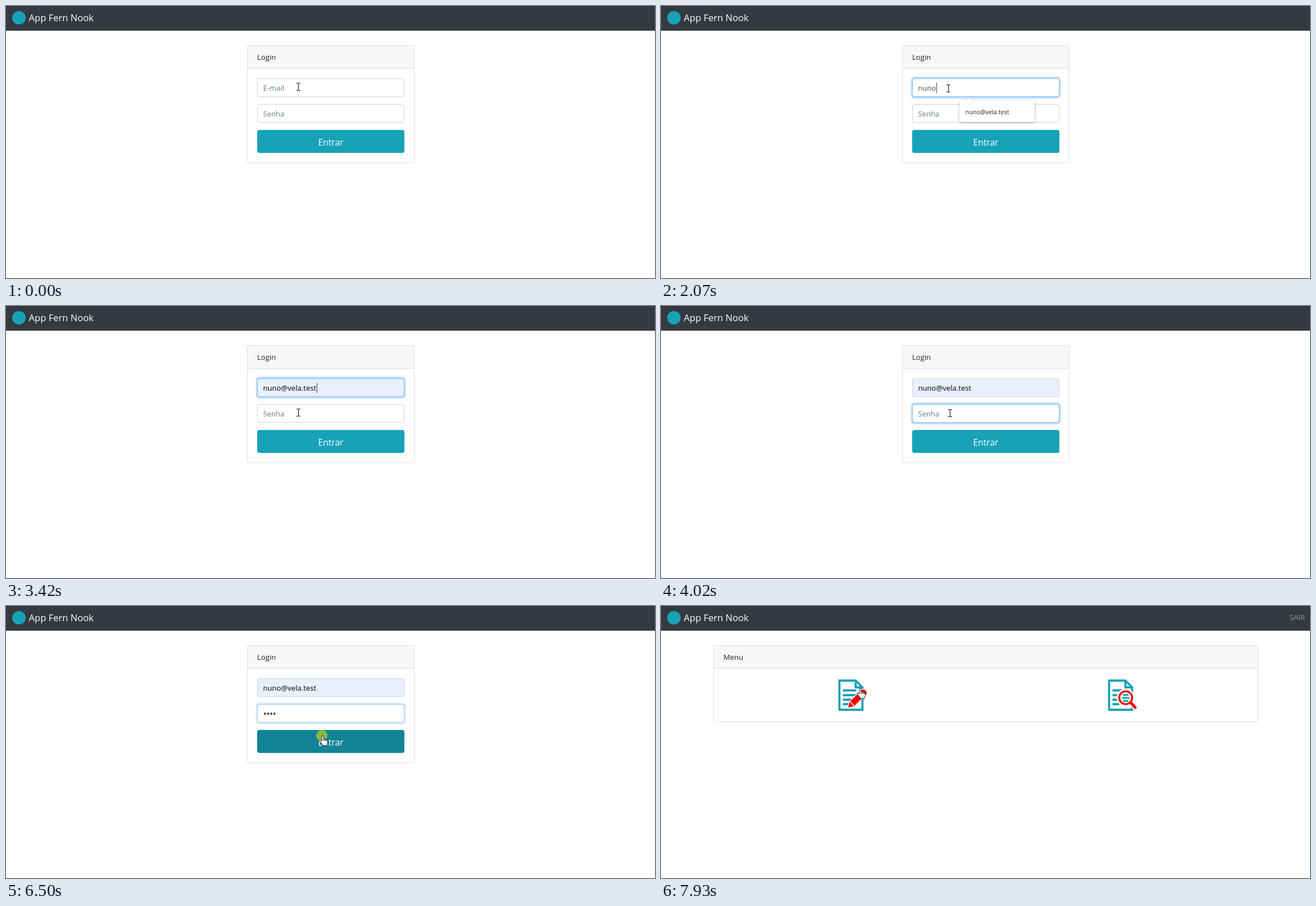
An HTML page for the animation above (7.99 s loop, 1155x485 px).

```html
<!DOCTYPE html>
<html lang="pt">
<head>
<meta charset="utf-8">
<title>Login</title>
<style>
  html, body { margin: 0; width: 100%; height: 100%; overflow: hidden; background: #fff; }
  svg { display: block; width: 1155px; height: 485px; font: 13.1px "Open Sans", "Noto Sans", sans-serif; fill: none; }
  text { fill: #212529; white-space: pre; }
  .card { fill: #fff; stroke: #dfdfdf; }
  .head { fill: #f7f7f7; stroke: #dfdfdf; }
  .field { fill: #fff; stroke: #ced4da; }
  .hint { fill: #5f7f92; }
  .popup { fill: #fff; filter: drop-shadow(0 1px 2px #0005); }
  .small { font-size: 10.8px; }
  .teal { stroke: #17a2b8; stroke-width: 3.8; }
  .red { stroke: #f00; }
  .halo { stroke: #fff; }
</style>
</head>
<body>
<svg viewBox="0 0 1155 485">
  <defs>
    <g id="page">
      <path class="teal" d="M2 2H31L43 14V54H2Z" fill="#fff"/>
      <path class="teal" d="M31 2V14H43" stroke-width="3"/>
      <path class="teal" d="M8 19.5H32M8 28H32M8 36H26M8 44H20"/>
    </g>
    <g id="ring">
      <rect x="446" y="-1.5" width="264" height="36" rx="5" stroke="#007bff" stroke-opacity=".25" stroke-width="3"/>
      <rect x="447.5" y=".5" width="261" height="32" rx="3.5" stroke="#80bdff"/>
    </g>
  </defs>

  <path fill="#343a40" d="M0 0H1155V44H0Z"/>
  <circle id="logo" cx="23" cy="21" r="12" fill="#17a2b8"/>
  <text x="40.500" y="27" font-size="16.6" style="fill:#fff">App Fern Nook</text>

  <g id="login">
    <rect class="card" x="429.500" y="70.500" width="297" height="209" rx="3.500"/>
    <path class="head" d="M429.500 111.500V74a3.500 3.500 0 0 1 3.500-3.500H723a3.500 3.500 0 0 1 3.500 3.500V111.500Z"/>
    <text x="447" y="96">Login</text>
    <rect id="emailBox" class="field" x="447.500" y="129.500" width="261" height="32" rx="3.500"/>
    <rect class="field" x="447.500" y="175.500" width="261" height="32" rx="3.500"/>
    <use id="ringEmail" href="#ring" y="129"/>
    <use id="ringPass" href="#ring" y="175"/>
    <text id="emailHint" class="hint" x="457.500" y="150.500">E-mail</text>
    <text id="passHint" class="hint" x="457.500" y="196.500">Senha</text>
    <text id="email" x="457.500" y="150.500"></text>
    <g id="dots" fill="#343a40"></g>
    <path id="caret" d="M.5 0V18" stroke="#343a40"/>
    <rect id="buttonRing" x="445.500" y="219.500" width="265" height="44" rx="5.500" stroke="#3ab0c3" stroke-opacity=".5" stroke-width="3"/>
    <rect id="button" x="447" y="221" width="262" height="41" rx="4"/>
    <text x="578" y="248.500" font-size="15.6" text-anchor="middle" style="fill:#fff">Entrar</text>
    <g id="popup">
      <g class="popup">
        <path d="M541 169L548 163L555 169Z"/>
        <rect id="popupBox" x="531" y="168" rx="4"/>
      </g>
      <path id="hover" fill="#eee" d="M531 173H664V203H531Z"/>
      <g id="items" class="small"></g>
    </g>
  </g>

  <g id="menu">
    <rect class="card" x="93.500" y="70.500" width="969" height="136" rx="3.500"/>
    <path class="head" d="M93.500 111.500V74a3.500 3.500 0 0 1 3.500-3.500H1059a3.500 3.500 0 0 1 3.500 3.500V111.500Z"/>
    <text x="111" y="96">Menu</text>
    <text x="1146" y="25" text-anchor="end" style="fill:#999c9f">SAIR</text>
    <g id="icons">
      <use href="#page" x="315.500" y="131"/>
      <g transform="translate(333 181) rotate(-44)">
        <path d="M0 0L9-5.500H39a4 4 0 0 1 4 4V1.500a4 4 0 0 1-4 4H9Z" fill="#f00" stroke="#fff" stroke-width="2.500" paint-order="stroke"/>
        <path class="halo" d="M9.500-5V5M34-5.500V5.500" stroke-width="1.500"/>
      </g>
      <use href="#page" x="795.500" y="131"/>
      <g stroke-linecap="round">
        <path class="halo" d="M835 172L844 181" stroke-width="9"/>
        <circle class="halo" cx="827" cy="163.500" r="12" stroke-width="8" fill="#fff"/>
        <path class="teal" d="M822 158.500H832M820 164H834M822 169.500H832" stroke-linecap="butt" style="stroke-width:3"/>
        <circle class="red" cx="827" cy="163.500" r="11.500" stroke-width="3.500"/>
        <path class="red" d="M836.500 173L844 181" stroke-width="5"/>
      </g>
    </g>
  </g>

  <g id="cursor">
    <circle id="click" cx="0" cy="0" r="10" fill="#9dc52f" fill-opacity=".82"/>
    <path id="beam" d="M-3-6.500H-1Q.5-6.500.5-5V5Q.5 6.500-1 6.500H-3M4-6.500H2Q.5-6.500.5-5V5Q.5 6.500 2 6.500H4" stroke="#000"/>
    <path id="arrow" d="M0 0V13L3 10.300L5.200 15.300L7.400 14.300L5.200 9.500H9.500Z" fill="#000" stroke="#fff" stroke-width=".7"/>
    <path id="hand" d="M0 1.500Q0 0 1.500 0T3 1.500V6Q5.500 5.300 5.700 7Q8 6.500 8.300 8Q10.500 7.500 10.500 9.500V13Q10 15 9 16.500V18H1.500V16.500L-4 10Q-4.500 8 -2.500 8.200L0 10Z M3 6V9.500M5.700 7V9.800M8.300 8V10" fill="#fff" stroke="#111" stroke-linejoin="round"/>
  </g>
</svg>
<script>
const LOOP = 7990;
const ADDRESS = 'nuno@vela.test';
const SAVED = ['gil@vela.test', 'gil.vinda@onda.test', 'rosendo@vela.test', 'dora@vela.test',
  'gil2@vela.test', 'rosendo.central@onda.test'];
const EMAIL_KEYS = [1560, 1740, 1940, 2070];
const PASS_KEYS = [4490, 4690, 4820, 5150];
const CARET_ON = [[480, 900], [1410, 2560], [3080, 3430], [3430, 4020], [4490, 5700], [6200, 6440]];
const CLICKS = [[70, 545], [3000, 3210], [3430, 3600], [6440, 6650]];
const PICK = 3080, PASS_FOCUS = 3430, SUBMIT = 6440, NEW_PAGE = 6760, LOADED = 6830;
// time, x, y
const PATH = [[0, 520, 144], [69, 520, 144], [70, 511, 147], [2390, 511, 147], [2870, 545, 187],
  [3220, 545, 187], [3500, 514, 191], [5960, 514, 191], [6450, 562, 231], [7250, 562, 231], [7930, 353, 147]];

const el = id => document.getElementById(id);
const show = (id, on) => el(id).setAttribute('display', on ? 'inline' : 'none');
const set = (id, attrs) => { for (const k in attrs) el(id).setAttribute(k, attrs[k]); };
const ramp = (t, start, length) => Math.min(1, Math.max(0, (t - start) / length));
const within = (t, spans) => spans.some(([a, b]) => t >= a && t < b);
const typed = (t, keys) => keys.filter(k => t >= k).length;

function pointer(t) {
  const i = Math.max(1, PATH.findIndex(p => p[0] > t));
  const [a, b] = t >= PATH.at(-1)[0] ? [PATH.at(-1), PATH.at(-1)] : [PATH[i - 1], PATH[i]];
  let k = ramp(t, a[0], b[0] - a[0] || 1);
  k = k * k * (3 - 2 * k);
  return [a[1] + (b[1] - a[1]) * k, a[2] + (b[2] - a[2]) * k];
}

const listMarkup = list => list.map((s, i) => `<text x="541.500" y="${192.5 + i * 30.65}">${s}</text>`).join('');
let listed;
function fillPopup(list) {
  if (listed === list) return;
  listed = list;
  el('items').innerHTML = listMarkup(list);
  set('popupBox', list === SAVED ? { width: 154, height: 192 } : { width: 134, height: 39 });
}
const MATCH = [ADDRESS];

function draw(t) {
  const [x, y] = pointer(t);
  const onMenu = t >= NEW_PAGE;
  const popupOpen = t >= 70 && t < PICK;
  const hovered = popupOpen && y > 172;
  const overButton = !onMenu && y > 221;
  const overField = !onMenu && !hovered && (y < 162 || (y > 175 && y < 208));

  show('login', !onMenu);
  show('menu', onMenu);
  show('logo', !onMenu || t >= LOADED);
  show('icons', t >= LOADED);

  show('popup', popupOpen);
  fillPopup(t < EMAIL_KEYS[0] ? SAVED : MATCH);
  show('hover', hovered);

  const picked = t >= PICK, filled = picked || hovered;
  const letters = typed(t, EMAIL_KEYS);
  const email = el('email');
  email.textContent = filled ? ADDRESS : ADDRESS.slice(0, letters);
  email.style.font = hovered ? '11.8px "Liberation Sans", Arial, sans-serif' : '';
  email.style.fill = filled ? '#000' : '#495057';
  show('emailHint', !letters);
  el('emailBox').style.fill = filled ? '#e8f0fe' : '#fff';

  const dots = typed(t, PASS_KEYS);
  show('passHint', !dots);
  [...el('dots').children].forEach((d, i) => d.setAttribute('display', i < dots ? 'inline' : 'none'));

  const emailFocus = t < 70 ? 0 : Math.max(.15, ramp(t, 420, 190)) * (1 - ramp(t, PASS_FOCUS, 150));
  set('ringEmail', { opacity: emailFocus });
  set('ringPass', { opacity: ramp(t, PASS_FOCUS, 150) * (1 - ramp(t, SUBMIT, 150)) });
  set('buttonRing', { opacity: ramp(t, SUBMIT + 60, 120) });
  set('button', { fill: overButton ? '#138496' : '#17a2b8' });

  const inPass = t >= PASS_FOCUS;
  const caretX = inPass ? 458 + dots * 5.6 : 458 + (letters ? email.getComputedTextLength() : 0);
  show('caret', within(t, CARET_ON));
  set('caret', { transform: `translate(${Math.round(caretX)} ${inPass ? 182 : 137})` });

  const overIcon = onMenu && x > 315 && x < 365 && y > 131 && y < 187;
  const hand = overButton || overIcon;
  set('cursor', { transform: `translate(${Math.round(x)} ${Math.round(y)})` });
  show('click', within(t, CLICKS));
  show('hand', hand);
  show('beam', overField);
  show('arrow', !hand && !overField);
}

el('dots').innerHTML = PASS_KEYS.map((_, i) => `<circle cx="${461 + i * 5.6}" cy="192" r="1.900"/>`).join('');
const start = performance.now();
function tick() {
  draw((performance.now() - start) % LOOP);
  requestAnimationFrame(tick);
}
tick();
</script>
</body>
</html>
```
